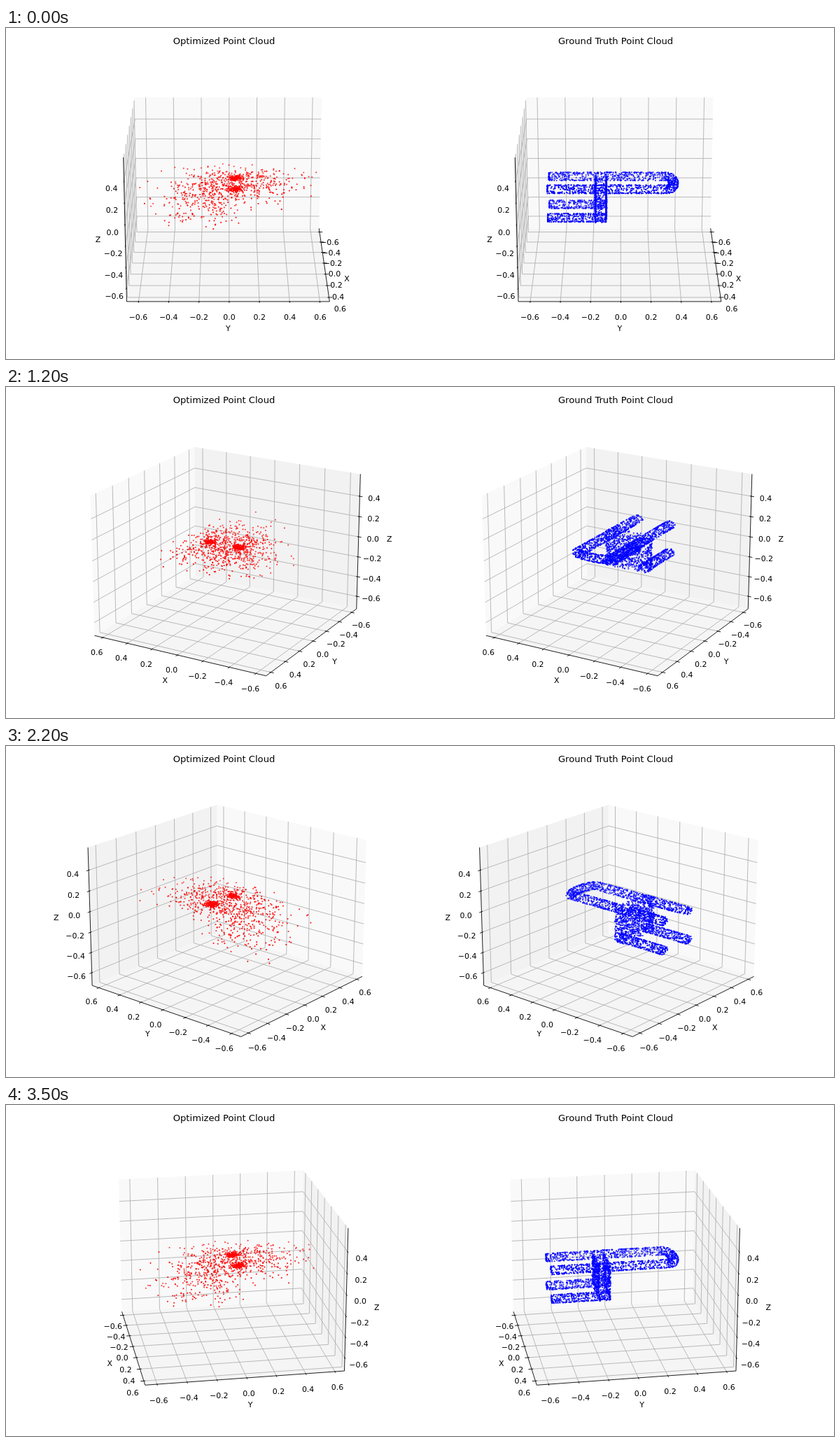
Write an HTML page with a canvas that moves like this. It is 1183 by 473 pixels and loops after 3600 ms.

```html
<!DOCTYPE html>
<html lang="en">
<head>
<meta charset="utf-8">
<title>Point clouds</title>
<style>
  html, body { margin: 0; width: 100%; height: 100%; overflow: hidden; background: #fff; }
  canvas { display: block; }
</style>
</head>
<body>
<canvas id="stage" width="1183" height="473"></canvas>
<script>
const ctx = document.getElementById('stage').getContext('2d');
const FONT = '"DejaVu Sans", sans-serif';
const PT = 1183 / 15 / 72;          // one point in pixels
const SCALE = 2336, DIST = 10, MID_Y = 239.2;
const ELEV = 20 * Math.PI / 180;
const STEP_MS = 100, STEPS = 36;

// Axis limits share one range; the box has a 4:4:3 aspect.
const RANGE = 1.29;
const CENTER = [-0.003, -0.007, -0.056];
const ASPECT = [8 / 7, 8 / 7, 6 / 7];
const DELTA = ASPECT.map(a => a / 12);
const HALF = ASPECT.map(a => a * 25 / 48);
const AXES = [
  { name: 'X', tickDir: 1, flip: 1, pane: '#f9f9f9' },
  { name: 'Y', tickDir: 0, flip: 0, pane: '#f2f2f2' },
  { name: 'Z', tickDir: 0, flip: 0, pane: '#f5f5f5' }
];
const TICK_PAD = 0.7, LABEL_PAD = 1.521;

const toBox = (v, i) => (v - CENTER[i]) / RANGE * ASPECT[i];
const withAt = (p, i, v) => p.map((c, k) => k === i ? v : c);

function makeRandom(seed) {
  return () => {
    seed = seed + 0x6D2B79F5 | 0;
    let t = Math.imul(seed ^ seed >>> 15, 1 | seed);
    t = t + Math.imul(t ^ t >>> 7, 61 | t) ^ t;
    return ((t ^ t >>> 14) >>> 0) / 4294967296;
  };
}

function trueCloud() {
  const rnd = makeRandom(11), points = [];
  const span = (a, b) => a + (b - a) * rnd();
  const repeat = (n, make) => { while (n--) points.push(make().map(toBox)); };
  const W = 0.132, RX = 0.041, RZ = 0.036, TOP = 0.069, LOW = -0.208;

  const rail = (n, x, z, y0, y1) => repeat(n, () => {
    const a = span(0, 2 * Math.PI);
    return [x + RX * Math.cos(a), span(y0, y1), z + RZ * Math.sin(a)];
  });
  for (const x of [-W, W]) {
    rail(530, x, TOP, -0.5, 0.34);
    rail(310, x, LOW, -0.5, -0.1);
    // closed rail ends
    for (const z of [TOP, LOW]) repeat(25, () => {
      const a = span(0, 2 * Math.PI), r = Math.sqrt(rnd());
      return [x + RX * r * Math.cos(a), -0.5, z + RZ * r * Math.sin(a)];
    });
  }
  // bowed bar that joins the upper rails
  repeat(240, () => {
    const s = span(-1, 1), a = span(0, 2 * Math.PI);
    return [s * W, 0.335 + 0.028 * (1 - s * s) + 0.034 * Math.cos(a), TOP + RZ * Math.sin(a)];
  });
  // block: two plates and the sides between them
  for (const y of [-0.175, -0.1])
    repeat(350, () => [span(-0.165, 0.165), y + span(-0.003, 0.003), span(-0.24, 0.1)]);
  for (const x of [-0.165, 0.165])
    repeat(90, () => [x, span(-0.175, -0.1), span(-0.24, 0.1)]);
  return points;
}

function fittedCloud() {
  const rnd = makeRandom(29), points = [];
  const normal = (m, s) =>
    m + s * Math.sqrt(-2 * Math.log(1 - rnd())) * Math.cos(2 * Math.PI * rnd());
  const clamp = (v, a, b) => Math.max(a, Math.min(b, v));
  const repeat = (n, make) => { while (n--) points.push(make().map(toBox)); };

  for (const x of [-0.115, 0.115]) {
    repeat(245, () => [
      clamp(normal(x, 0.08), -0.32, 0.32),
      clamp(normal(0.07, 0.21), -0.63, 0.61),
      clamp(normal(0.06, 0.045), -0.05, 0.17)
    ]);
    repeat(110, () => [
      clamp(normal(x, 0.08), -0.3, 0.3),
      clamp(normal(-0.17, 0.16), -0.62, 0.15),
      -0.28 + 0.3 * rnd()
    ]);
    repeat(120, () => [normal(x, 0.02), normal(0.042, 0.023), normal(0.058, 0.009)]);
  }
  return points;
}

const PLOTS = [
  { title: 'Optimized Point Cloud', x: 311.5, rgb: '255,0,0', points: fittedCloud() },
  { title: 'Ground Truth Point Cloud', x: 871, rgb: '0,0,255', points: trueCloud() }
];

function makeCamera(azim, midX) {
  const ca = Math.cos(azim), sa = Math.sin(azim);
  const ce = Math.cos(ELEV), se = Math.sin(ELEV);
  return ([x, y, z]) => {
    const near = ca * x + sa * y;
    const depth = DIST - near * ce - z * se;
    const k = SCALE / depth;
    return [midX + (ca * y - sa * x) * k, MID_Y - (z * ce - near * se) * k, depth];
  };
}

function trace(points) {
  ctx.beginPath();
  points.forEach(([x, y], i) => i ? ctx.lineTo(x, y) : ctx.moveTo(x, y));
}

function strokeLine(points, color) {
  trace(points);
  ctx.strokeStyle = color;
  ctx.lineWidth = 0.8 * PT;
  ctx.stroke();
}

// Centred text on a whole-pixel baseline.
function text(str, x, y, pt) {
  ctx.font = `${pt * PT}px ${FONT}`;
  ctx.textAlign = 'center';
  ctx.textBaseline = 'alphabetic';
  ctx.fillStyle = '#000';
  ctx.fillText(str, x, Math.round(y));
}

function ticksOf(i) {
  const list = [];
  for (let n = -3; n <= 3; n++) {
    const v = n / 5;
    if (Math.abs(v - CENTER[i]) <= RANGE / 2)
      list.push({ at: toBox(v, i), label: (n < 0 ? '\u2212' : '') + Math.abs(v).toFixed(1) });
  }
  return list;
}
const TICKS = AXES.map((_, i) => ticksOf(i));

// Push a point away from the box centre, except along its own axis.
const outward = (p, axis, pad) =>
  p.map((c, i) => i === axis ? c : c + Math.sign(c) * pad * DELTA[i]);

function drawFrame(project, azim) {
  const maxIsBack = [Math.cos(azim) < -1e-9, Math.sin(azim) < -1e-9, false];
  const back = HALF.map((h, i) => maxIsBack[i] ? h : -h);

  AXES.forEach((axis, i) => {
    const j = (i + 1) % 3, k = (i + 2) % 3;
    const a = withAt(back, j, -back[j]), c = withAt(back, k, -back[k]);
    const b = withAt(a, k, -back[k]);
    trace([back, a, b, c].map(project));
    ctx.closePath();
    ctx.fillStyle = axis.pane;
    ctx.fill();
  });

  AXES.forEach((axis, i) => {
    const j = (i + 1) % 3, k = (i + 2) % 3;
    for (const { at } of TICKS[i]) {
      const p = withAt(back, i, at);
      strokeLine([withAt(p, j, -p[j]), p, withAt(p, k, -p[k])].map(project), '#b0b0b0');
    }
  });

  AXES.forEach((axis, i) => {
    const edge = withAt(back, axis.flip, -back[axis.flip]);
    strokeLine([edge, withAt(edge, i, -edge[i])].map(project), '#000');

    const d = axis.tickDir, sign = maxIsBack[d] ? 1 : -1;
    for (const { at, label } of TICKS[i]) {
      const p = withAt(edge, i, at);
      const end = f => project(withAt(p, d, p[d] + f * sign * DELTA[d]));
      strokeLine([end(0.1), end(-0.2)], '#000');
      const [x, y] = project(outward(p, i, TICK_PAD));
      text(label, x, y + 8.6, 10);
    }
    const [x, y] = project(outward(withAt(edge, i, 0), i, LABEL_PAD));
    text(axis.name, x, y + 2.9, 10);
  });
}

function drawPoints(points, rgb, project) {
  const dots = points.map(project);
  let near = Infinity, far = -Infinity;
  for (const [, , z] of dots) {
    near = Math.min(near, z);
    far = Math.max(far, z);
  }
  for (const [x, y, z] of dots) {
    const alpha = 1 - 0.35 * (z - near) / (far - near);
    ctx.fillStyle = `rgba(${rgb},${alpha.toFixed(2)})`;
    ctx.beginPath();
    ctx.arc(x, y, 1.05, 0, 2 * Math.PI);
    ctx.fill();
  }
}

function draw(step) {
  const azim = step * 2 * Math.PI / STEPS;
  ctx.fillStyle = '#fff';
  ctx.fillRect(0, 0, 1183, 473);
  for (const { title, x, rgb, points } of PLOTS) {
    const project = makeCamera(azim, x + 5.9);
    drawFrame(project, azim);
    drawPoints(points, rgb, project);
    text(title, x, 22.6, 12);
  }
}

let shown = -1;
function tick() {
  const step = Math.floor(performance.now() / STEP_MS) % STEPS;
  if (step !== shown) draw(shown = step);
  requestAnimationFrame(tick);
}
tick();
</script>
</body>
</html>
```
